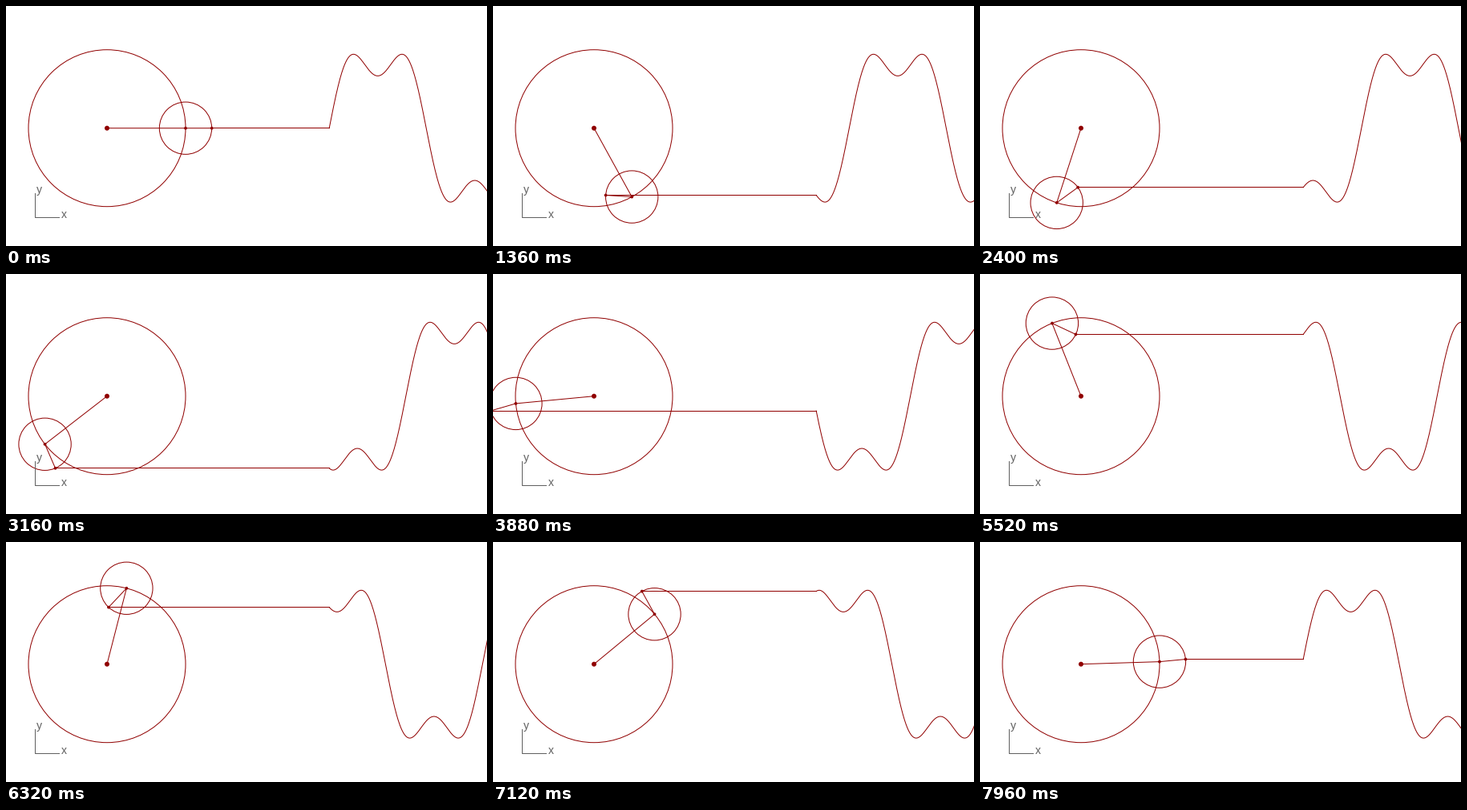
Recreate the animation shown at these times as a matplotlib script. Size 600 by 300 pixels, loop 8000 ms.

```python
import numpy as np
import matplotlib.pyplot as plt
from matplotlib.animation import FuncAnimation
from matplotlib.patches import Circle

FRAMES, INTERVAL = 200, 40
DPI = 100
PX = 72 / DPI
RED, GRAY = "#900000", "#606060"
CX, CY = 126, 152.7
RADIUS = 98
WAVE_X, PERIOD = 403.2, 242

fig = plt.figure(figsize=(6, 3), dpi=DPI, facecolor="white")
ax = fig.add_axes([0, 0, 1, 1])
ax.set_xlim(0, 600)
ax.set_ylim(300, 0)
ax.axis("off")


def line(**kw):
    return ax.plot([], [], color=RED, lw=PX, **kw)[0]


def ring(x, y, r):
    return ax.add_patch(Circle((x, y), r, fill=False, ec=RED, lw=PX))


def dot(r):
    return ax.add_patch(Circle((CX, CY), r, fc=RED, ec="none", zorder=4))


def height(angle):
    return CY + RADIUS * (np.sin(angle) + np.sin(3 * angle) / 3)


# Axis marker
ax.plot([36, 36, 66], [234, 264, 264], color=GRAY, lw=PX, snap=True)
for label, x, y in (("y", 38, 234), ("x", 69, 265)):
    ax.text(x, y, label, color=GRAY, family="Liberation Sans",
            size=14 * PX, va="baseline", ha="left")

ring(CX, CY, RADIUS)
small = ring(CX + RADIUS, CY, RADIUS / 3)
arm = line(snap=False)
link = line(snap=True)
wave = line(snap=False)
dot(3)
joint, tip = dot(1.9), dot(1.9)

xs = np.arange(WAVE_X, 603, 0.5)
lag = 2 * np.pi * (xs - WAVE_X) / PERIOD


def update(i):
    a = 2 * np.pi * i / FRAMES
    jx, jy = CX + RADIUS * np.cos(a), CY + RADIUS * np.sin(a)
    tx, ty = jx + RADIUS / 3 * np.cos(3 * a), height(a)
    small.center = joint.center = (jx, jy)
    tip.center = (tx, ty)
    arm.set_data([CX, jx, tx], [CY, jy, ty])
    # Half a pixel up, so snapping picks the row that holds the tip
    link.set_data([tx, WAVE_X], [ty - 0.5, ty - 0.5])
    wave.set_data(xs, height(a - lag))
    return small, arm, link, wave, joint, tip


anim = FuncAnimation(fig, update, frames=FRAMES, interval=INTERVAL,
                     init_func=lambda: update(0), repeat=True, repeat_delay=0)
plt.show()
```
